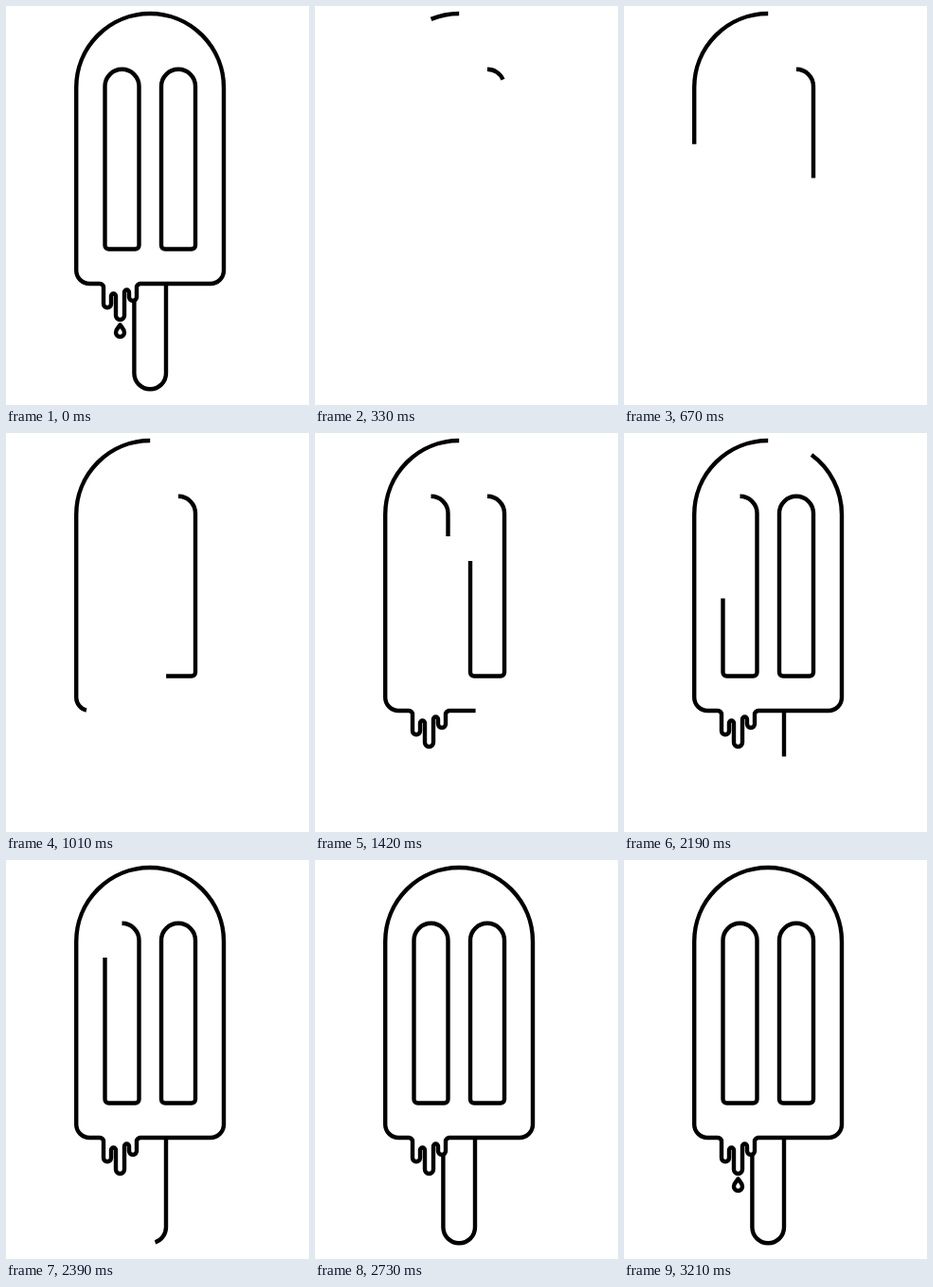
Animation of 320x421 px, one loop 3.87 s. Source, as an HTML page:

```html
<!DOCTYPE html>
<html lang="en">
<head>
<meta charset="utf-8">
<title>Ice pop line drawing</title>
<style>
  html, body { margin: 0; width: 100%; height: 100%; overflow: hidden; background: #fff; }
  svg { display: block; width: 320px; height: 421px; fill: none; stroke: #000; stroke-width: 4.4; stroke-linejoin: round; }
</style>
</head>
<body>
<svg viewBox="0 0 320 421"></svg>
<script>
const LOOP = 3870, HOLD = 330, STEP = 2880 / 42;
const svg = document.querySelector('svg');

const pane = x => `M${x} 66.8a18 18 0 0 1 18 18V252.5a4 4 0 0 1-4 4h-28a4 4 0 0 1-4-4V84.8a18 18 0 0 1 18-18`;

// Each stroke: path, step at which it starts, pixels drawn per step
const strokes = [
  // left side and drips
  ['M152.2 8A78 78 0 0 0 74.2 86V279a14 14 0 0 0 14 14H99a4 4 0 0 1 4 4V314.3a4 4 0 0 0 8 0V306' +
   'a2.5 2.5 0 0 1 5 0V326.5a4.5 4.5 0 0 0 9 0V302a2.5 2.5 0 0 1 5 0V307a4 4 0 0 0 8 0V297a4 4 0 0 1 4-4', -1, 30.35],
  // bottom and right side
  ['M141.6 293H216a14 14 0 0 0 14-14V86A78 78 0 0 0 152 8', 15.08, 30.4],
  [pane(182), -1, 20.8],
  [pane(122.5), 13.8, 23.8],
  // stick
  ['M169 293V387.5a16.8 16.8 0 0 1-33.6 0V310', 24.83, 22.3],
  // falling drop
  ['M125 344.5a4.5 4.5 0 0 1-9 0C116 341 119 339 120.5 336.5C122 339 125 341 125 344.5', 36, 6]
].map(([d, start, speed]) => {
  const path = document.createElementNS(svg.namespaceURI, 'path');
  path.setAttribute('d', d);
  svg.append(path);
  return { path, start, speed };
});

function draw(now) {
  const t = now % LOOP;
  const step = t < HOLD ? 99 : Math.min(99, Math.floor((t - HOLD) / STEP + 0.15));
  for (const { path, start, speed } of strokes) {
    const done = step >= 42 ? 2000 : (step - start) * speed;
    path.style.visibility = done > 0 ? 'visible' : 'hidden';
    path.setAttribute('stroke-dasharray', `${Math.max(0, done)} 2000`);
  }
}

const begin = performance.now();
function tick() {
  draw(performance.now() - begin);
  requestAnimationFrame(tick);
}
tick();
</script>
</body>
</html>
```
